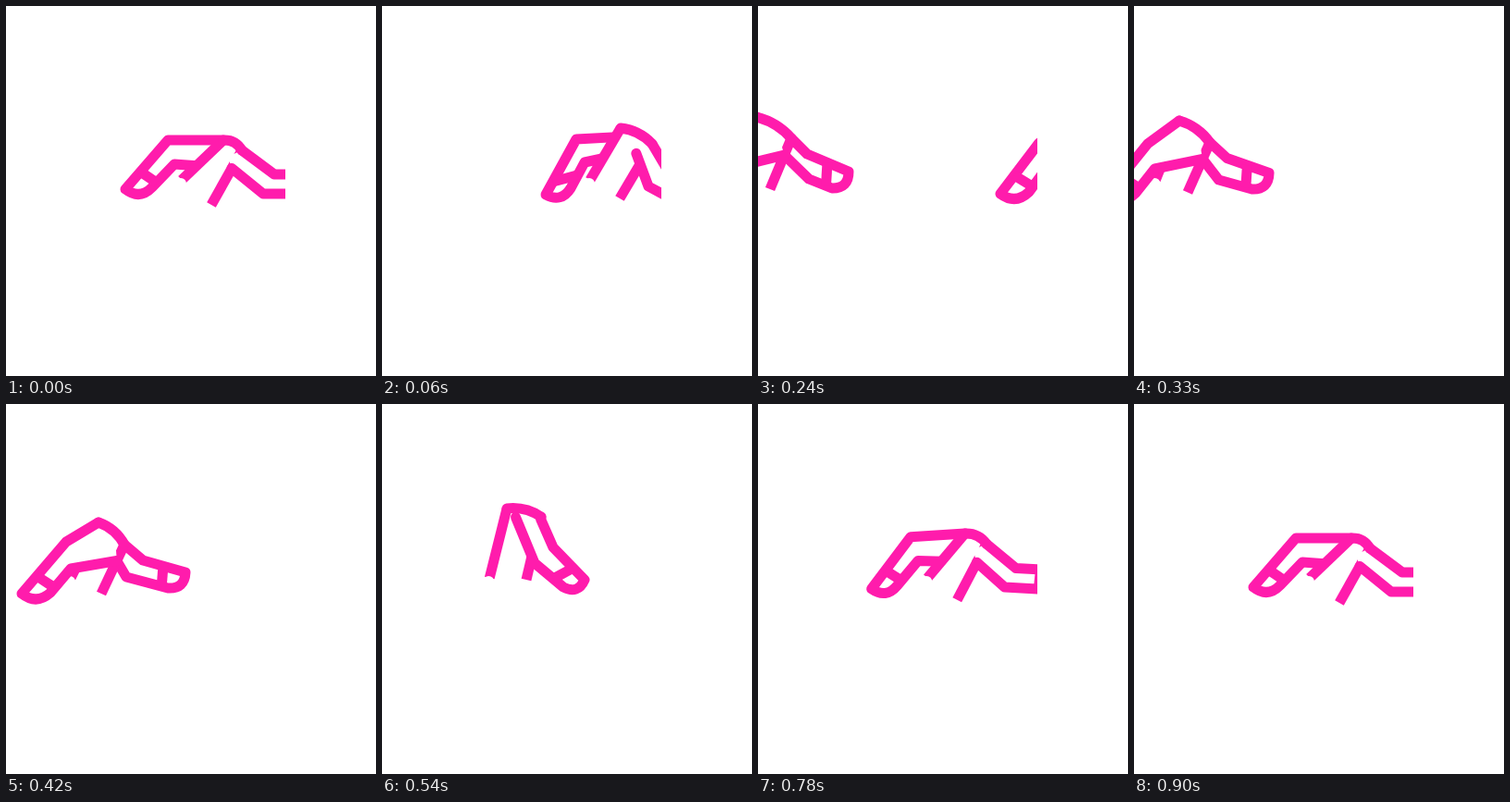
Recreate the animation shown at these times as an HTML page with a canvas. Size 400x400 px, loop 0.93 s.

```html
<!DOCTYPE html>
<html lang="en">
<head>
<meta charset="utf-8">
<title>Running figure</title>
<style>
html, body { margin: 0; width: 100%; height: 100%; overflow: hidden; background: #fff; }
canvas { display: block; width: 400px; height: 400px; }
</style>
</head>
<body>
<canvas id="stage" width="400" height="400"></canvas>
<script>
const ctx = document.getElementById('stage').getContext('2d');
const PINK = '#ff1cac', WHITE = '#fff';
const STEP = 30, LOOP = 930, LAP = 338, EDGE = 302;

const lerp = (a, b, k) => a + (b - a) * k;
const mix = (p, q, k) => [lerp(p[0], q[0], k), lerp(p[1], q[1], k)];
const shift = (p, dx) => [p[0] + dx, p[1]];
// The point lying `dist` from p on the way to q; negative goes away from q.
const toward = (p, q, dist) => mix(p, q, dist / Math.hypot(q[0] - p[0], q[1] - p[1]));

// torso: nape, chest, waist
// arms: elbow and hand on the back side, then hand and elbow on the front side
// forward: how far the near arm has swung to the front
const pose = (time, forward, torso, near, far) => ({ time, forward, torso, near, far });
const START = pose(0, 1, [[235, 145], [255, 156], [222, 215]],
  [[278, 203], [322, 203], [342, 182], [290, 182]],
  [[175, 145], [129, 198], [158, 196], [182, 171]]);
const PUSH = pose(60, .75, [[258, 132], [292, 149], [257, 208]],
  [[288, 195], [325, 215], [342, 198], [308, 176]],
  [[210, 144], [177, 204], [204, 197], [219, 169]]);
const ENTER = pose(240, 0, [[-2, 120], [36, 143], [13, 198]],
  [[-35, 149], [-76, 203], [-45, 201], [-25, 174]],
  [[55, 187], [80, 197], [98, 179], [53, 160]]);
const REACH = pose(420, 0, [[100, 128], [128, 152], [103, 205]],
  [[65, 149], [17, 205], [48, 204], [70, 178]],
  [[130, 187], [175, 199], [194, 182], [148, 169]]);
const CROSS = pose(540, .3, [[135, 113], [172, 122], [156, 190]],
  [[165, 172], [196, 198], [219, 190], [185, 155]],
  [[132, 150], [130, 172], [148, 172], [147, 148]]);
const STRIDE = pose(660, 1, [[190, 125], [223, 137], [195, 202]],
  [[233, 183], [275, 192], [295, 174], [245, 164]],
  [[136, 140], [106, 204], [130, 196], [147, 165]]);

function movePose(p, dx, time) {
  const all = points => points.map(q => shift(q, dx));
  return pose(time, p.forward, all(p.torso), all(p.near), all(p.far));
}

const keys = [movePose(START, -LAP, 0), movePose(PUSH, -LAP, 60),
  ENTER, REACH, CROSS, STRIDE, movePose(START, 0, 900)];

// Arms swing around the shoulder, with angles measured from straight down.
function swing(p, q, from, to, k) {
  const polar = (pt, c) => [Math.atan2(pt[0] - c[0], pt[1] - c[1]),
    Math.hypot(pt[0] - c[0], pt[1] - c[1])];
  const [angle, radius] = mix(polar(p, from), polar(q, to), k);
  const c = mix(from, to, k);
  return [c[0] + radius * Math.sin(angle), c[1] + radius * Math.cos(angle)];
}

function poseAt(time) {
  let i = 0;
  while (i < keys.length - 2 && time >= keys[i + 1].time) i++;
  const a = keys[i], b = keys[i + 1];
  let k = (time - a.time) / (b.time - a.time);
  if (i === keys.length - 2) k = 1 - (1 - k) ** 2;
  const from = mix(a.torso[0], a.torso[1], .5), to = mix(b.torso[0], b.torso[1], .5);
  const arm = side => a[side].map((p, n) => swing(p, b[side][n], from, to, k));
  return pose(time, lerp(a.forward, b.forward, k),
    a.torso.map((p, n) => mix(p, b.torso[n], k)), arm('near'), arm('far'));
}

function trace(points) {
  ctx.beginPath();
  points.forEach(p => ctx.lineTo(...p));
}

function line(points, cap = 'butt', color = PINK, width = 11) {
  trace(points);
  ctx.lineCap = cap;
  ctx.strokeStyle = color;
  ctx.lineWidth = width;
  ctx.stroke();
}

function drawArm([elbowB, handB, handF, elbowF], nape, armpit, chest, forward) {
  const rootB = mix(nape, armpit, forward);
  const rootF = mix(armpit, chest, Math.min(1, forward * 3));
  const mid = mix(handB, handF, .5);
  const dx = handF[0] - handB[0], dy = handF[1] - handB[1], len = Math.hypot(dx, dy);
  const tip = [mid[0] - dy / len * 13, mid[1] + dx / len * 13];
  const inside = toward(mix(rootB, rootF, .5), mid, -10);

  const outline = () => {
    trace([rootB, elbowB, handB]);
    ctx.quadraticCurveTo(...tip, ...handF);
    ctx.lineTo(...elbowF);
    ctx.lineTo(...rootF);
  };
  outline();
  ctx.lineTo(...inside);
  ctx.fillStyle = WHITE;
  ctx.fill();
  outline();
  ctx.strokeStyle = PINK;
  ctx.lineWidth = 11;
  ctx.lineCap = 'round';
  ctx.stroke();

  const cuff = 7 + 18 * Math.min(1, forward * 2);
  line([toward(handB, elbowB, 32 - cuff), toward(handF, elbowF, cuff)]);
}

function drawFigure({ forward, torso: [nape, chest, waist], near, far }) {
  const armpit = mix(chest, waist, .33);
  const hip = [waist[0] - Math.max(32, 33 + (205 - waist[1]) * .45), 188];
  drawArm(far, nape, armpit, chest, 1 - forward);

  trace([nape, chest, waist, hip]);
  ctx.fillStyle = WHITE;
  ctx.fill();
  line([hip, waist], 'butt', WHITE, 12);
  line([nape, hip]);
  line([chest, waist]);
  ctx.beginPath();
  ctx.arc(hip[0] - 1, hip[1] + 4, 6, 0, Math.PI * 2);
  ctx.fillStyle = WHITE;
  ctx.fill();

  drawArm(near, nape, armpit, chest, forward);

  const dx = chest[0] - nape[0], dy = chest[1] - nape[1], len = Math.hypot(dx, dy);
  const mid = mix(nape, chest, .5);
  ctx.beginPath();
  ctx.moveTo(...nape);
  ctx.quadraticCurveTo(mid[0] + dy / len * 7, mid[1] - dx / len * 7, ...chest);
  ctx.lineCap = 'round';
  ctx.strokeStyle = PINK;
  ctx.lineWidth = 11;
  ctx.stroke();
}

function render(now) {
  const time = Math.floor(now % LOOP / STEP) * STEP;
  const figure = poseAt(time);
  ctx.fillStyle = WHITE;
  ctx.fillRect(0, 0, 400, 400);
  ctx.save();
  ctx.beginPath();
  ctx.rect(0, 0, EDGE, 400);
  ctx.clip();
  ctx.lineJoin = 'round';
  if (time > 90) drawFigure(figure);
  if (time < 420) drawFigure(movePose(figure, LAP, time));
  ctx.restore();
}

const begin = performance.now();
function loop() {
  render(performance.now() - begin);
  requestAnimationFrame(loop);
}
loop();
</script>
</body>
</html>
```
